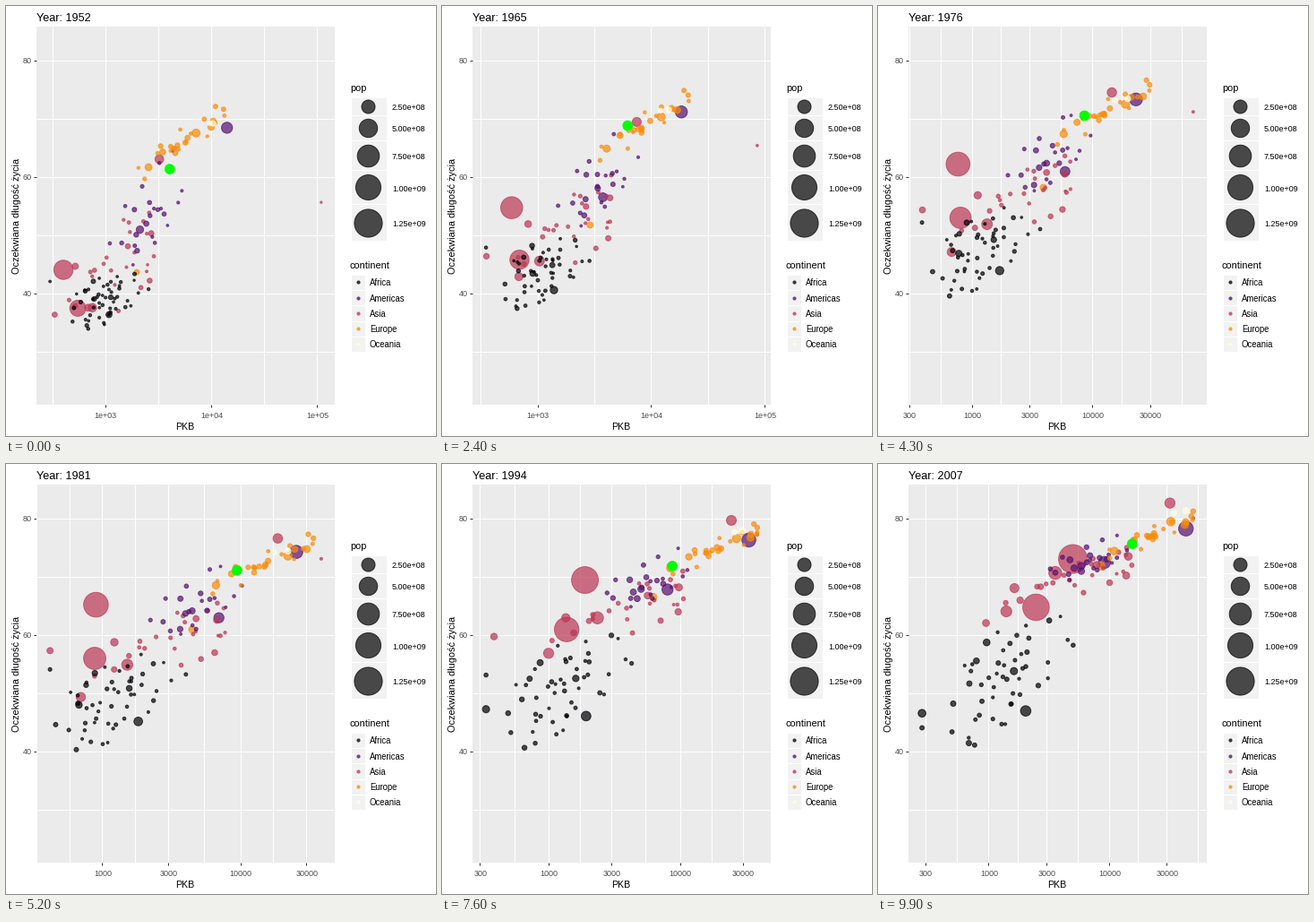
A matplotlib script for the animation above (10000 ms loop, 480 by 480 pixels).

```python
import matplotlib.pyplot as plt
import numpy as np
from matplotlib.animation import FuncAnimation
from matplotlib.collections import LineCollection
from matplotlib.colors import to_rgba
from matplotlib.patches import Rectangle

FRAMES, INTERVAL = 100, 100
LEFT, RIGHT, TOP, BOTTOM = 34, 367, 23, 445
T = np.linspace(0, 1, FRAMES)
YEARS = 1952 + 55 * T

COLORS = {"Africa": "#000004", "Americas": "#56106E", "Asia": "#BB3754",
          "Europe": "#F98C0A", "Oceania": "#FFFFE0"}

# Poorest and richest income per head, which set the sliding x window
LOW = np.interp(YEARS, [1952, 1957, 1972, 1982, 1992, 1997, 2002, 2007],
                np.log10([299, 336, 357, 424, 347, 312, 241, 278]))
HIGH = np.interp(YEARS, [1952, 1957, 1967, 1972, 1977, 1982, 1987, 1997, 2007],
                 np.log10([108382, 113523, 80895, 109348, 59265, 33693,
                           31541, 41283, 49357]))

# Leading bubbles: group, population range in millions, income and life knots
LEADERS = [
    ("Asia", (556, 1319), (400, 592, 830, 1740, 4959), (44, 55, 64.7, 69.1, 73)),
    ("Asia", (372, 1110), (547, 690, 838, 1300, 2452), (37.4, 46, 55.4, 60.6, 64.7)),
    ("Americas", (158, 301), (13990, 24500, 42952), (68.4, 74, 78.2)),
    ("Asia", (82, 224), (750, 1440, 3541), (37.5, 54, 70.6)),
    ("Asia", (86, 127), (3217, 18000, 31656), (63, 76.2, 82.6)),
    ("Americas", (57, 190), (2109, 6850, 9066), (50.9, 62.4, 72.4)),
    ("Africa", (33, 135), (1077, 1800, 2014), (36.3, 45, 46.9)),
    ("Asia", (47, 150), (684, 670, 1391), (37.5, 48.5, 64)),
    ("Europe", (22, 71), (1969, 4300, 8458), (43.6, 60.3, 71.8)),
    ("Europe", (69, 82), (7144, 21500, 32170), (67.5, 73.2, 79.4)),
    ("Asia", (20, 48), (331, 351, 397, 355, 944), (36.3, 57, 62)),
    ("Africa", (14, 65), (781, 900, 730, 330, 270), (39, 48, 46.5)),
]
HIGHLIGHT = ((4029, 6250, 9500, 8300, 15390), (61.3, 69, 71, 71.5, 75.6))

# Clouds: count, median population, growth, then knots for the centre and
# spread of log income, the centre of life, its slope and its scatter
CLOUDS = {
    "Asia": (26, 8, 2.7, (3.2, 3.6, 3.85), (.3, .4), (48, 61, 71.5), (15, 8), (5, 2)),
    "Americas": (23, 6, 2.4, (3.45, 3.7, 3.87), (.2, .2), (54, 65, 73), (15, 6), (4, 1.5)),
    "Europe": (27, 10, 1.3, (3.72, 4.15, 4.37), (.2, .18), (66, 72, 77.3), (12, 8), (1.5, .9)),
    "Africa": (50, 4, 3.5, (3.02, 3.1, 3.16), (.2, .29), (39.5, 49.5, 54), (4, 10), (2.5, 5)),
    "Oceania": (2, 8, 1.8, (4, 4.2, 4.5), (.02, .08), (69, 73.5, 80.6), (5, 5), (.2, .2)),
}

plt.rcParams["font.family"] = ["Liberation Sans", "DejaVu Sans"]

rng = np.random.default_rng(7)
logx, life, radius, colors = [], [], [], []


def track(values):
    """Evenly spaced knots joined by straight segments over the loop."""
    return np.interp(T, np.linspace(0, 1, len(values)), values)


def size(pop):
    return 1.5 + 15 * np.sqrt(np.asarray(pop) / 1319)


def add(x, years, r, color):
    logx.append(np.clip(x, LOW, HIGH))
    life.append(years)
    radius.append(r)
    colors.append(color)


def scatter_group(group, count, pop, growth, x, dx, y, slope, dy):
    for _ in range(count):
        u, v = np.clip(rng.normal(size=2), -1.9, 1.9)
        wave = np.sin(2 * np.pi * (rng.uniform(.5, 1.5) * T + rng.random()))
        shift = track(dx) * u
        years = track(y) + track(slope) * shift + track(dy) * (v + .2 * wave)
        people = min(pop * rng.lognormal(0, 1), 55) * growth ** (T - .45)
        add(track(x) + shift + .03 * wave, years, size(people),
            to_rgba(COLORS[group], .7))


for group, pop, gdp, years in LEADERS:
    add(track(np.log10(gdp)), track(years), size(track(pop)),
        to_rgba(COLORS[group], .7))
add(HIGH, track((55.6, 69, 76, 80)), size(track((.2, 3))),
    to_rgba(COLORS["Asia"], .7))
add(LOW, track((42, 50, 57, 44)), size(track((1, 12))),
    to_rgba(COLORS["Africa"], .7))
for group, spec in CLOUDS.items():
    scatter_group(group, *spec)
add(track(np.log10(HIGHLIGHT[0])), track(HIGHLIGHT[1]), np.full(FRAMES, 5.8),
    to_rgba("#00FF00"))

logx, life, radius = (np.array(a).T for a in (logx, life, radius))


def y_px(v):
    return 190.5 - (v - 60) * 6.5


fig = plt.figure(figsize=(480 / 72, 480 / 72), dpi=72, facecolor="white")
ax = fig.add_axes([0, 0, 1, 1])
ax.set_xlim(0, 480)
ax.set_ylim(480, 0)
ax.axis("off")


def box(x0, y0, x1, y1, color, **kw):
    ax.add_patch(Rectangle((x0, y0), x1 - x0, y1 - y0, fc=color, **kw))


def label(x, y, text, fs, color="black", va="baseline", **kw):
    return ax.text(x, y, text, fontsize=fs, color=color, va=va, **kw)


def dots(x, y, r, c):
    return ax.scatter(x, y, s=(2 * np.asarray(r) - 1) ** 2, c=c,
                      edgecolors=c, linewidths=1, zorder=3)


def hline(x0, x1, v, color):
    # Half a pixel down keeps the snapped line on its own pixel row
    y = y_px(v) + .4
    ax.plot([x0, x1], [y, y], color=color, lw=1, zorder=1,
            solid_capstyle="butt")


box(LEFT, TOP, RIGHT, BOTTOM, "#EBEBEB", lw=0, zorder=0)
for v in range(30, 90, 10):
    hline(LEFT, RIGHT, v, "white")
for v in (40, 60, 80):
    hline(31, 34, v, "#333333")
    label(29, y_px(v), str(v), 9, "#4D4D4D", "center_baseline", ha="right")

title = label(34, 17, "", 12.6)
label(200, 473, "PKB", 10.6, ha="center")
label(15.5, 234, "Oczekwiana długość życia", 11, ha="center",
      rotation=90, rotation_mode="anchor")

# Size legend: each key is as tall as its dot plus a margin
label(384, 95, "pop", 11)
y0 = 102
for millions in range(250, 1500, 250):
    r = float(size(millions))
    y1 = y0 + 2.45 * r + (2 if r > 9 else 0)
    mid = (y0 + y1) / 2
    box(385, y0, 425, y1, "#F2F2F2", ec="white", lw=1)
    dots([404], [mid], [r], [to_rgba("black", .7)])
    label(431, mid + 1, f"{millions * 1e6:.2e}", 9, va="center_baseline")
    y0 = y1

# Colour legend
label(384, 293, "continent", 11)
for i, (name, color) in enumerate(COLORS.items()):
    mid = 308.3 + 17.28 * i
    box(385, mid - 8.64, 401, mid + 8.64, "#F2F2F2", ec="white", lw=1)
    dots([392.5], [mid], [2.1], [to_rgba(color, .7)])
    label(406, mid, name, 9.5, va="center_baseline")

grid = LineCollection([], colors="white", linewidths=1, zorder=1)
ticks = LineCollection([], colors="#333333", linewidths=1, zorder=2)
ax.add_collection(grid, autolim=False)
ax.add_collection(ticks, autolim=False)
tick_labels = [label(0, 459.5, "", 9, "#4D4D4D", ha="center")
               for _ in range(6)]
cloud = dots(logx[0], life[0], radius[0], colors)


def breaks(lo, hi):
    """Whole decades if three fit, otherwise a 1-3-10 series."""
    majors = [d for d in range(2, 6) if lo <= d <= hi]
    names = [f"{10 ** d:.0e}" for d in majors]
    if len(majors) < 3:
        values = [m * 10 ** d for d in range(2, 6) for m in (1, 3)]
        values = [v for v in values if lo <= np.log10(v) <= hi]
        majors, names = [np.log10(v) for v in values], [str(v) for v in values]
    step = majors[1] - majors[0]
    wide = np.array([majors[0] - step, *majors, majors[-1] + step])
    lines = np.concatenate([wide, (wide[1:] + wide[:-1]) / 2])
    return majors, names, lines[(lines >= lo) & (lines <= hi)]


def update(i):
    pad = .05 * (HIGH[i] - LOW[i])
    lo, hi = LOW[i] - pad, HIGH[i] + pad

    def x_px(v):
        return LEFT + (np.asarray(v) - lo) / (hi - lo) * (RIGHT - LEFT)

    majors, names, lines = breaks(lo, hi)
    spots = x_px(majors)
    grid.set_segments([[(p, TOP), (p, BOTTOM)] for p in x_px(lines) - .5])
    ticks.set_segments([[(p, BOTTOM), (p, BOTTOM + 3)] for p in spots - .5])
    for text in tick_labels:
        text.set_text("")
    for text, name, x in zip(tick_labels, names, spots):
        text.set_text(name)
        text.set_x(x)

    cloud.set_offsets(np.column_stack([x_px(logx[i]), y_px(life[i])]))
    cloud.set_sizes((2 * radius[i] - 1) ** 2)
    title.set_text(f"Year: {round(YEARS[i])}")
    return cloud, grid, ticks, title, *tick_labels


anim = FuncAnimation(fig, update, frames=FRAMES, interval=INTERVAL,
                     repeat=True, repeat_delay=0, blit=False)
plt.show()
```
